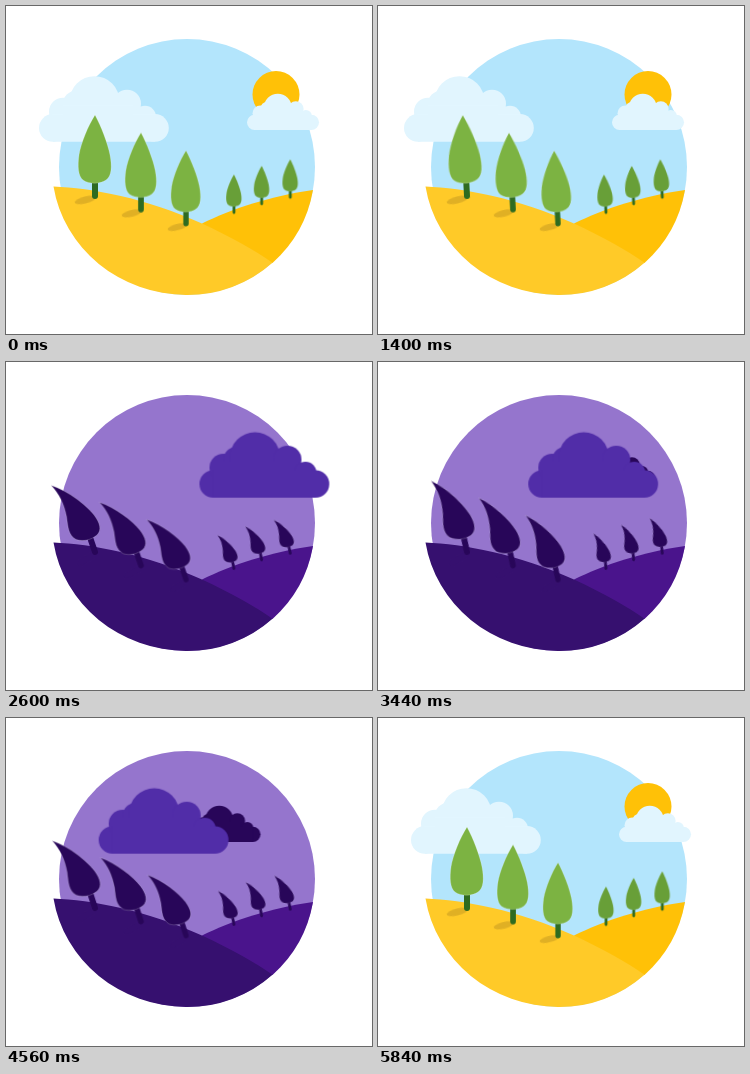
Animation, 366 px wide and 328 px high, one loop 5880 ms. Source, as an HTML page without scripts:

```html
<!DOCTYPE html>
<html lang="en">
<head>
<meta charset="utf-8">
<title>Weather</title>
<style>
@property --sky { syntax: "<color>"; inherits: true; initial-value: #b3e5fc }
@property --hill { syntax: "<color>"; inherits: true; initial-value: #ffca28 }
@property --far-hill { syntax: "<color>"; inherits: true; initial-value: #ffc107 }
@property --leaf { syntax: "<color>"; inherits: true; initial-value: #7cb342 }
@property --far-leaf { syntax: "<color>"; inherits: true; initial-value: #689f38 }
@property --trunk { syntax: "<color>"; inherits: true; initial-value: #2e6b20 }
@property --shade { syntax: "<color>"; inherits: true; initial-value: #e0b024 }
@property --far-shade { syntax: "<color>"; inherits: true; initial-value: #ffc107 }
@property --cloud { syntax: "<color>"; inherits: true; initial-value: #512da8 }
@property --far-cloud { syntax: "<color>"; inherits: true; initial-value: #280659 }
@property --fair { syntax: "<number>"; inherits: true; initial-value: 1 }
@property --storm { syntax: "<number>"; inherits: true; initial-value: 0 }
@property --bolt { syntax: "<number>"; inherits: true; initial-value: 0 }

html, body { margin: 0; width: 100%; height: 100%; overflow: hidden; background: #fff }
svg { display: block; animation: mood 5880ms linear infinite }

.sky { fill: var(--sky) }
.hill { fill: var(--hill) }
.far-hill { fill: var(--far-hill) }
.sun { fill: #ffc107; opacity: var(--fair) }
.fair { fill: #e1f5fe; opacity: var(--fair); animation: drift 5880ms linear infinite }
.storm { opacity: var(--storm) }
.near { fill: var(--cloud); animation: near 5880ms linear infinite }
.back { fill: var(--far-cloud); animation: back 5880ms linear infinite }
.bolt { fill: #fff; opacity: var(--bolt) }

.trees { --lean: 0deg }
.far { --lean: 7deg; --leaf-now: var(--far-leaf) }
.sway { animation: sway 5880ms ease-in-out infinite }
.leaf { fill: var(--leaf); stroke: #fff; stroke-opacity: .2; animation: bend 5880ms ease-in-out infinite }
.far .leaf { fill: var(--far-leaf) }
.trunk { stroke: var(--trunk); stroke-width: 6; stroke-linecap: round; animation: tilt 5880ms ease-in-out infinite }
.shade { fill: var(--shade); animation: shade 5880ms ease-in-out infinite }
.far .shade { fill: var(--far-shade); transform: rotate(-18deg); animation: none }

@keyframes mood {
  0%, 31.29%, 97.28%, 100% {
    --sky: #b3e5fc; --hill: #ffca28; --far-hill: #ffc107;
    --leaf: #7cb342; --far-leaf: #689f38; --trunk: #2e6b20;
    --shade: #e0b024; --far-shade: #ffc107;
    --cloud: #512da8; --far-cloud: #280659;
    --fair: 1; --storm: 0; --bolt: 0;
  }
  38.1%, 67.35%, 70.75%, 85.03%, 88.44%, 92.52% {
    --sky: #9575cd; --hill: #36106f; --far-hill: #4a148c;
    --leaf: #280659; --far-leaf: #280659; --trunk: #280659;
    --shade: #36106f; --far-shade: #4a148c;
    --cloud: #512da8; --far-cloud: #280659;
    --fair: 0; --storm: 1; --bolt: 0;
  }
  68.03%, 70.07%, 85.71%, 87.76% {
    --sky: #a188da; --hill: #d3c7eb; --far-hill: #d3c7eb;
    --leaf: #d3c7eb; --far-leaf: #d3c7eb; --trunk: #280659;
    --shade: #3c3636; --far-shade: #3c3636;
    --cloud: #d3c7eb; --far-cloud: #d3c7eb;
    --fair: 0; --storm: 1; --bolt: 1;
  }
}
@keyframes drift {
  0% { transform: none }
  38.1% { transform: translateX(-11.2px) }
  38.2%, 100% { transform: none }
}
@keyframes near {
  0%, 31.29% { transform: translate(232.6px, 135.7px) }
  97.28%, 100% { transform: translate(33.1px, 135.7px) }
}
@keyframes back {
  0%, 31.29% { transform: translate(237.7px, 124px) }
  97.28%, 100% { transform: translate(158.9px, 124px) }
}
@keyframes sway {
  0%, 9.52%, 19.05%, 28.91%, 97.28%, 100% { transform: rotate(0deg) }
  4.76%, 14.29%, 23.81% { transform: rotate(-3deg) }
  34.18%, 44.73%, 55.27%, 65.82%, 76.36%, 86.9% { transform: rotate(var(--lean)) }
  39.46%, 50%, 60.54%, 71.09%, 81.63%, 92.18% { transform: rotate(calc(var(--lean) + 9.6deg)) }
}
@keyframes bend {
  0%, 31.29%, 97.28%, 100% {
    d: path("M0 -81C6 -70 13 -52 15 -41C17 -30 17 -20 11 -16C6 -12 -6 -11.5 -12 -16C-17 -20 -17.5 -30 -16 -41C-14 -53 -7 -70 0 -81Z")
  }
  34.18%, 92.52% {
    d: path("M-44 -66.5C-27 -61 -9 -47 -1 -37C5 -29 7 -22 2 -17C-4 -12 -12 -10 -19 -12.5C-27 -17 -27 -25 -28.5 -35C-31 -48 -36 -58 -44 -66.5Z")
  }
}
@keyframes tilt {
  0%, 31.29%, 97.28%, 100% { d: path("M0 0L0 -16") }
  34.18%, 92.52% { d: path("M0 0L-5.5 -16") }
}
@keyframes shade {
  0%, 31.29%, 97.28%, 100% { transform: rotate(-14deg) }
  34.18%, 92.52% { transform: rotate(-32deg) }
}
</style>
</head>
<body>
<svg width="366" height="328" viewBox="0 0 366 328">
  <defs>
    <g id="cloud">
      <circle cx="13.8" cy="-13.8" r="13.8"/>
      <circle cx="24" cy="-30" r="14"/>
      <circle cx="37" cy="-38" r="13"/>
      <circle cx="55.5" cy="-40.5" r="25"/>
      <circle cx="88" cy="-38" r="14"/>
      <circle cx="106" cy="-25" r="11"/>
      <circle cx="116" cy="-13.8" r="13.8"/>
      <path d="M13.8 0V-27H24V-36H94V-27H116V0Z"/>
    </g>
  </defs>

  <circle class="sky" cx="181" cy="161" r="128"/>
  <circle class="sun" cx="270" cy="88.5" r="23.5"/>

  <g class="fair">
    <use href="#cloud" transform="translate(241 124) scale(.555)"/>
    <use href="#cloud" transform="translate(33 135.7)"/>
  </g>
  <g class="storm">
    <g class="back">
      <path class="bolt" d="M34 -1H38.5L42 7L35 18.5L45 39.5L30 19L37.5 7.5Z"/>
      <use href="#cloud" transform="scale(.555)"/>
    </g>
    <g class="near"><use href="#cloud"/></g>
  </g>

  <path class="far-hill" d="M196 217.5C225 203 265 190 307 184A128 128 0 0 1 266.5 257L220 250Z"/>
  <path class="hill" d="M47.5 180.5C85 182 140 192 196 217.5C225 231 250 245 266.5 256.7A128 128 0 0 1 180 289A135 128.5 0 0 1 47.5 180.5Z"/>

  <g class="trees far">
    <g transform="translate(228 206.5) scale(.47)">
      <ellipse class="shade" cx="4" cy="-.5" rx="8" ry="3"/>
      <g class="sway"><path class="trunk"/><path class="leaf"/></g>
    </g>
    <g transform="translate(255.7 197.8) scale(.47)">
      <ellipse class="shade" cx="4" cy="-.5" rx="8" ry="3"/>
      <g class="sway"><path class="trunk"/><path class="leaf"/></g>
    </g>
    <g transform="translate(284.3 191.3) scale(.47)">
      <ellipse class="shade" cx="4" cy="-.5" rx="8" ry="3"/>
      <g class="sway"><path class="trunk"/><path class="leaf"/></g>
    </g>
  </g>

  <g class="trees">
    <g transform="translate(89 190)">
      <ellipse class="shade" cx="-10.3" cy="1.5" rx="11" ry="3.5"/>
      <g class="sway"><path class="trunk"/><path class="leaf"/></g>
    </g>
    <g transform="translate(135 203.5) scale(.95)">
      <ellipse class="shade" cx="-10.3" cy="1.5" rx="11" ry="3.5"/>
      <g class="sway"><path class="trunk"/><path class="leaf"/></g>
    </g>
    <g transform="translate(180 217.5) scale(.9)">
      <ellipse class="shade" cx="-10.3" cy="1.5" rx="11" ry="3.5"/>
      <g class="sway"><path class="trunk"/><path class="leaf"/></g>
    </g>
  </g>
</svg>
</body>
</html>
```
